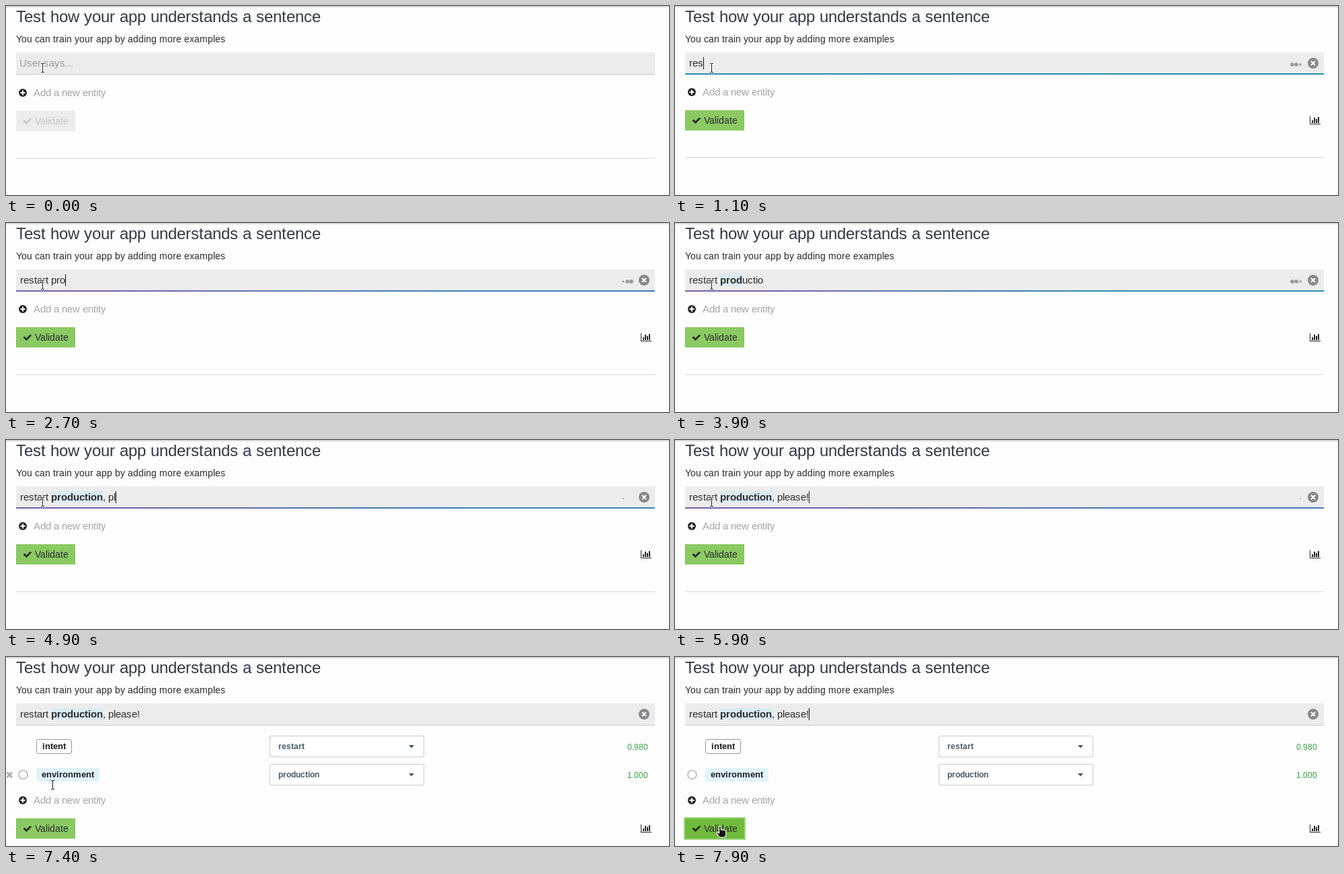
Animation of 986x281 px, one loop 8 s. Source, as an HTML page:

```html
<!DOCTYPE html>
<html>
<head>
<meta charset="utf-8">
<style>
html, body { margin: 0; width: 100%; height: 100%; overflow: hidden; background: #fdfdfd; }
body { position: relative; font: 15px/20px "Liberation Sans", Arial, sans-serif; color: #2b2b30; }
div, svg { position: absolute; white-space: pre; box-sizing: border-box; }
svg { overflow: visible; left: 0; top: 0; width: 1px; height: 1px; }
#shade { left: 0; top: 0; width: 100%; height: 3px; background: linear-gradient(#c9c9c9, #fdfdfd); }
#title { left: 15px; top: 6px; font-size: 24px; color: #323a45; }
#sub { left: 15px; top: 39px; font-size: 14px; }
#field { left: 15px; top: 69px; width: 950px; height: 32px; background: #ececec; }
#line { left: 15px; width: 950px; }
#hint { left: 20px; top: 75px; }
#typed { left: 21px; top: 75px; }
#typed b { background: #d9ebf1; }
#typed i { position: absolute; width: 1px; height: 18px; top: 1px; background: #111; }
#foot, #rows { left: 0; top: 0; width: 100%; }
#add { left: 41px; top: 119px; color: #a6a6a6; }
#button { left: 15px; top: 156px; width: 88px; height: 30px; padding: 5px 0 0 28px; font-size: 14px; }
#rule { left: 15px; top: 226px; width: 950px; height: 1px; background: #d8d8d8; }
.tag { left: 45px; height: 22px; padding: 0 8px; border-radius: 4px; font: bold 13px/20px "Liberation Sans", sans-serif; color: #1d1d22; }
.pick { left: 392px; width: 230px; height: 32px; padding: 5px 12px; border: 1px solid #cbcbcb; border-radius: 2px; background: #fff; font-size: 12px; font-weight: bold; color: #465a69; }
.score { left: 924px; font-size: 12px; color: #35a046; }
</style>
</head>
<body>
<div id="shade"></div>
<div id="title" class="text">Test how your app understands a sentence</div>
<div id="sub" class="text">You can train your app by adding more examples</div>
<div id="field"></div>
<div id="line"></div>
<div id="hint" class="text">User says...</div>
<div id="typed"></div>
<svg id="clear">
  <circle cx="949" cy="85" r="8" fill="#85898e"/>
  <path d="M946 82l6 6m0-6l-6 6" stroke="#fff" stroke-width="2"/>
</svg>
<svg id="dots" fill="#999"><circle cx="918" cy="87"/><circle cx="924" cy="87"/><circle cx="930" cy="87"/></svg>

<div id="rows">
  <div class="tag text" style="top:122px;border:1px dotted #333">intent</div>
  <div class="tag text" style="top:165px;height:20px;background:#dff4fa">environment</div>
  <div class="pick text" style="top:117px">restart</div>
  <div class="pick text" style="top:159px">production</div>
  <div class="score text" style="top:124px">0.980</div>
  <div class="score text" style="top:166px">1.000</div>
  <svg>
    <path d="M599 131h8l-4 4.500zM599 173h8l-4 4.500z" fill="#465a69"/>
    <circle cx="25.500" cy="175" r="6.500" fill="none" stroke="#bbb" stroke-width="1.700"/>
    <path id="remove" d="M1.500 171.500l7.500 7.500m0-7.500l-7.500 7.500" stroke="#aaa" stroke-width="2.600"/>
  </svg>
</div>

<div id="foot">
  <div id="add" class="text">Add a new entity</div>
  <div id="button" class="text">Validate</div>
  <div id="rule"></div>
  <svg>
    <circle cx="25" cy="129" r="6" fill="#26262b"/>
    <path d="M21.500 129h7m-3.500-3.500v7" stroke="#fff" stroke-width="2"/>
    <path id="check" d="M26 171.400l1.600-1.600 2.800 2.800 5.700-5.700 1.600 1.600-7.300 7.300z" stroke-width=".8" stroke-linejoin="round"/>
    <path id="chart" d="M944 165h1v11h15v1h-16zM947 171h2v4h-2zM950 167h2v8h-2zM953 169h2v6h-2zM956 166h2v9h-2z" fill="#26262b"/>
  </svg>
</div>

<svg id="beam" fill="none">
  <path id="bar" d="M-2.500-6.500h2l.5.5.5-.5h2M0-6V6M-2.500 6.500h2l.5-.5.5.5h2" stroke="#fff" stroke-width="3"/>
  <path d="M-2.500-6.500h2l.5.5.5-.5h2M0-6V6M-2.500 6.500h2l.5-.5.5.5h2" stroke="#111"/>
</svg>
<svg id="hand">
  <path d="M-1.500 1.500Q0-.500 1.500 1.500V6Q3 5 4.300 6.300 5.800 5.500 7 7 8.800 6.800 8.800 9V13L7 17H-1L-4.500 11.500Q-5 9-3 9.300L-1.500 11Z" fill="#111" stroke="#fff" stroke-width="1.200"/>
</svg>

<script>
const $ = id => document.getElementById(id);
const show = (id, on) => $(id).style.visibility = on ? "visible" : "hidden";
const mix = (a, b, k) => a + (b - a) * k;
const ruler = document.createElement("canvas").getContext("2d");
const sentence = "restart production, please!";
// Pointer path: time, x, y
const path = [[6700, 54, 91], [7000, 58, 118], [7400, 69, 189], [7500, 69, 212], [7600, 68, 236], [7700, 67, 246], [7900, 67, 251]];

// Rounds every glyph advance and kerning pair to whole pixels
function snap(text, font) {
  ruler.font = font;
  const width = s => ruler.measureText(s).width;
  return [...text].map((c, i) => {
    const next = text[i + 1] || "", w = width(c);
    const kern = Math.round(width(c + next) - w - width(next));
    return `<span style="letter-spacing:${Math.round(w) + kern - w}px">${c}</span>`;
  }).join("");
}

function pointer(t) {
  const i = path.findIndex(p => p[0] > t);
  if (i == 0) return path[0].slice(1);
  if (i < 0) return path[path.length - 1].slice(1);
  const a = path[i - 1], b = path[i], k = (t - a[0]) / (b[0] - a[0]);
  return [mix(a[1], b[1], k), mix(a[2], b[2], k)];
}

// Grows until 40 % of the cycle, shrinks until 80 %, then rests
function pulse(p) {
  p -= Math.floor(p);
  const k = Math.max(0, 1 - Math.abs(p - .4) / .4);
  return k * k * (3 - 2 * k);
}

function underline(t) {
  const k = Math.min(1, Math.max(0, (t - 1100) / 1600));
  const wave = .5 - .5 * Math.cos((t - 3900) / 2000 * Math.PI);
  const left = `rgb(${mix(40, 116, k)},${mix(141, 98, k)},${mix(178, 174, k)})`;
  const right = `rgb(${mix(36, 72, k * wave)},${mix(143, 120, k * wave)},178)`;
  return `linear-gradient(90deg, ${left} 15%, ${right} 70%)`;
}

function draw(t) {
  const active = t >= 800, done = t >= 6200, busy = active && !done;
  const count = active ? Math.min(sentence.length, Math.floor((t - 650) / 200) + 1) : 0;
  const bold = 8 + (t >= 4500 ? 10 : t >= 3500 ? 4 : 0);
  const text = sentence.slice(0, count), font = '15px "Liberation Sans"';
  const caret = t >= 5900 ? Math.floor((t - 5900) / 500) % 2 == 0 : t >= 400 && (t < 3800 || t >= 4000);
  $("typed").innerHTML = snap(text.slice(0, 8), font)
    + `<b>${snap(text.slice(8, bold), "bold " + font)}</b>`
    + snap(text.slice(bold), font) + (caret ? "<i></i>" : "");

  show("hint", !active);
  $("hint").style.color = t < 400 ? "#999" : "#b8b8b8";
  show("clear", active);
  show("dots", busy);
  [...$("dots").children].forEach((dot, i) => dot.setAttribute("r", 3 * pulse((t - 470 - 160 * i) / 1400)));
  const line = $("line").style;
  line.background = busy ? underline(t) : "#c8c8c8";
  line.top = busy ? "100px" : "101px";
  line.height = busy ? "2px" : "1px";

  const [x, y] = pointer(t), over = y >= 240;
  $("rows").style.display = done ? "block" : "none";
  $("remove").style.display = done && y > 154 && y < 196 ? "block" : "none";
  $("foot").style.top = (done ? 84 : active ? -1 : 0) + "px";
  show("chart", active);
  const ink = active ? "#2b2b30" : "#c6c6c6", button = $("button").style;
  $("check").style.fill = $("check").style.stroke = button.color = ink;
  button.background = over ? "#70bb3b" : active ? "#8bca63" : "#ececec";
  button.boxShadow = over ? "0 0 0 2px #a6d888" : active ? "inset 0 0 0 1px #82c558" : "none";

  show("beam", !over);
  show("hand", over);
  $("beam").style.transform = `translate(${Math.round(x) + .5}px,${Math.round(y) + 1}px)`;
  $("hand").style.transform = `translate(${Math.round(x)}px,${Math.round(y)}px)`;
}

function tick(now) {
  draw(Math.floor(now % 8000 / 100) * 100);
  requestAnimationFrame(tick);
}

for (const el of document.querySelectorAll(".text"))
  el.innerHTML = snap(el.textContent, getComputedStyle(el).font);
draw(0);
requestAnimationFrame(tick);
</script>
</body>
</html>
```
